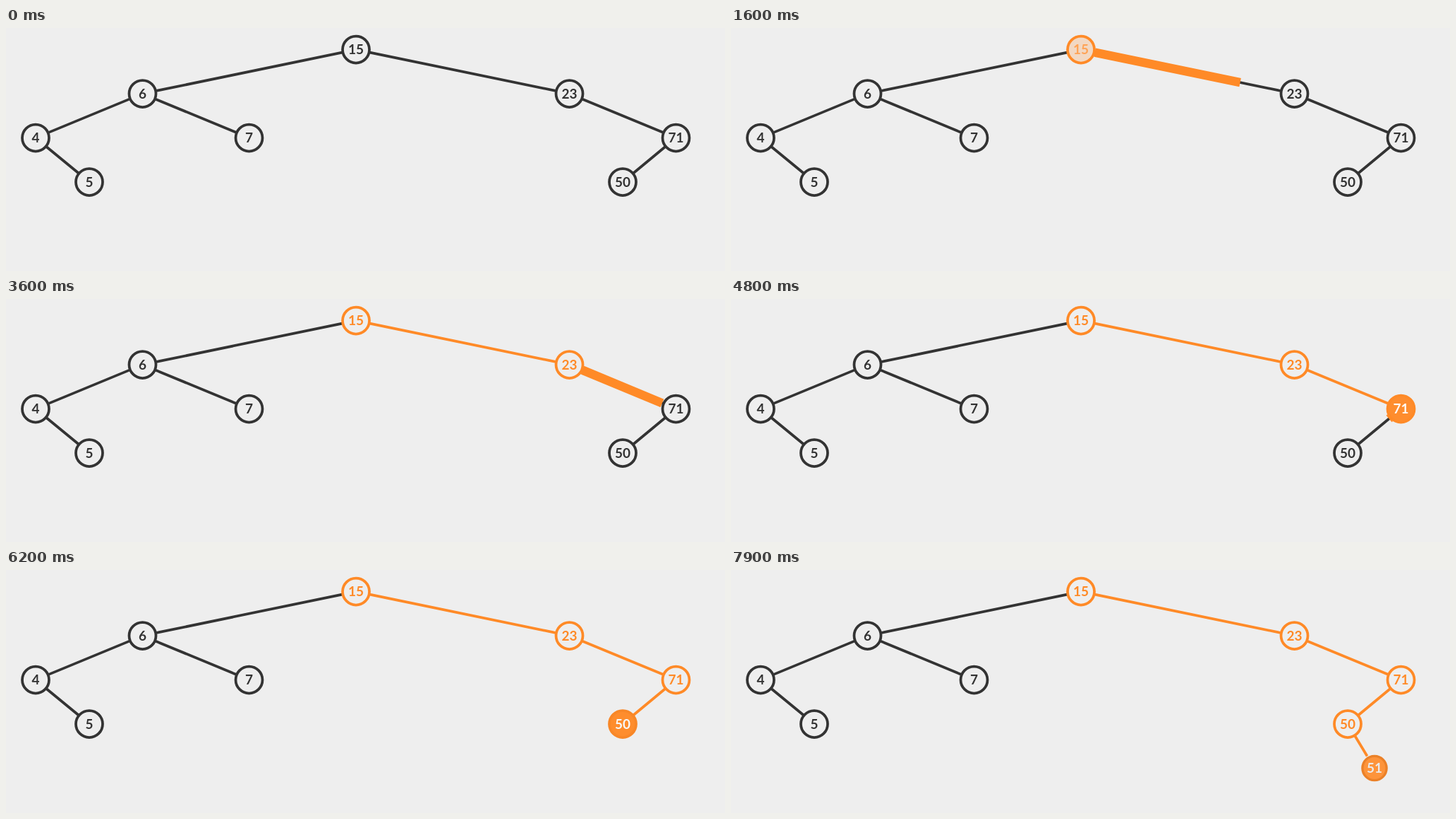
An HTML page for the animation above (8 s loop, 1019 by 344 pixels).

```html
<!DOCTYPE html>
<html lang="en">
<head>
<meta charset="utf-8">
<title>Search tree insertion</title>
<style>
  html, body { margin: 0; width: 100%; height: 100%; overflow: hidden; background: #eee; }
  svg { display: block; width: 100%; height: 100%; }
  text { font: 700 19px Lato, sans-serif; text-anchor: middle; }
</style>
</head>
<body>
<svg viewBox="0 0 1019 344"></svg>
<script>
const LOOP = 8000, FRAME = 100;
const RADIUS = 19, STROKE = 3.75, TRAIL = 12.5, GAP = 20;
const DARK = [51, 51, 51], PAPER = [238, 238, 238], ORANGE = [255, 138, 39], WHITE = [255, 255, 255];

// key, x, row, parent
const nodes = [
  [15, 496, 0], [6, 193.5, 1, 15], [23, 798.5, 1, 15],
  [4, 42, 2, 6], [7, 344.5, 2, 6], [71, 949.5, 2, 23],
  [5, 118, 3, 4], [50, 874, 3, 71], [51, 912, 4, 50]
].map(([key, x, row, parent]) => ({ key, x, y: 30.5 + 62.5 * row, parent }));
const byKey = Object.fromEntries(nodes.map(n => [n.key, n]));

// Each visit fills a node; each walk draws the edge into a node while its parent empties.
const span = (start, duration, end) => ({ start, duration, end });
const visits = {
  15: span(360, 560, 900), 23: span(2190, 540, 2700), 71: span(3890, 640, 4500),
  50: span(5667, 667, 6200), 51: span(7277, 880, 7900)
};
const walks = {
  23: span(1010, 950, 1900), 71: span(2880, 830, 3700),
  50: span(4630, 830, 5500), 51: span(6400, 880, 7300)
};
const NEW_KEY = 51, LABEL_TIME = 6500;

const svg = document.querySelector("svg");
function add(tag, attributes) {
  const element = document.createElementNS("http://www.w3.org/2000/svg", tag);
  set(element, attributes);
  return svg.appendChild(element);
}
function set(element, attributes) {
  for (const name in attributes) element.setAttribute(name, attributes[name]);
}
const mix = (a, b, p) => a.map((v, i) => v + (b[i] - v) * p);
const rgb = color => `rgb(${color.map(Math.round)})`;
const ease = t => t < 0.5 ? 4 * t ** 3 : 1 - 4 * (1 - t) ** 3;

function progress(step, time) {
  if (!step) return 0;
  const t = (Math.min(time, step.end) - step.start) / step.duration;
  return ease(Math.max(0, Math.min(1, t)));
}
const walkProgress = (step, time) => step && time >= step.end ? 1 : progress(step, time);

for (const node of nodes) {
  const parent = byKey[node.parent];
  if (!parent) continue;
  const dx = node.x - parent.x, dy = node.y - parent.y, length = Math.hypot(dx, dy);
  const ux = dx / length, uy = dy / length;
  Object.assign(node, { x1: parent.x + ux * GAP, y1: parent.y + uy * GAP,
                        x2: node.x - ux * GAP, y2: node.y - uy * GAP });
  parent.walk = walks[node.key] || parent.walk;
  const { x1, y1, x2, y2 } = node;
  node.edge = add("line", { x1, y1, x2, y2, "stroke-width": STROKE });
}
for (const node of nodes) {
  if (walks[node.key]) node.trail = add("line", { x1: node.x1, y1: node.y1, "stroke-width": TRAIL, stroke: rgb(ORANGE) });
}
for (const node of nodes) {
  node.circle = add("circle", { cx: node.x, cy: node.y });
  node.label = add("text", { x: node.x, y: node.y + 6.8 });
  node.label.textContent = node.key;
}

function drawEdge(node, time) {
  const walk = walks[node.key], done = walk && time >= walk.end;
  set(node.edge, {
    stroke: rgb(done ? ORANGE : DARK),
    visibility: node.key === NEW_KEY && !done ? "hidden" : "visible"
  });
  if (!walk) return;
  const p = progress(walk, time);
  set(node.trail, {
    x2: node.x1 + (node.x2 - node.x1) * p,
    y2: node.y1 + (node.y2 - node.y1) * p,
    visibility: p > 0 && !done ? "visible" : "hidden"
  });
}

function drawNode(node, time) {
  const lit = progress(visits[node.key], time);
  const emptied = walkProgress(node.walk, time);
  const isNew = node.key === NEW_KEY;
  const scale = isNew ? lit : 1;
  const ring = mix(DARK, ORANGE, emptied > 0 ? Math.max(lit, emptied) : lit);
  set(node.circle, {
    r: RADIUS * scale,
    "stroke-width": STROKE * scale,
    stroke: rgb(ring),
    fill: rgb(mix(mix(PAPER, ORANGE, lit), PAPER, emptied))
  });
  set(node.label, {
    fill: rgb(mix(mix(DARK, WHITE, lit), ORANGE, emptied)),
    visibility: isNew && time < LABEL_TIME ? "hidden" : "visible"
  });
}

function draw(now) {
  const time = Math.floor(now % LOOP / FRAME) * FRAME;
  for (const node of nodes) {
    if (node.edge) drawEdge(node, time);
    drawNode(node, time);
  }
  requestAnimationFrame(draw);
}
draw(0);
</script>
</body>
</html>
```
